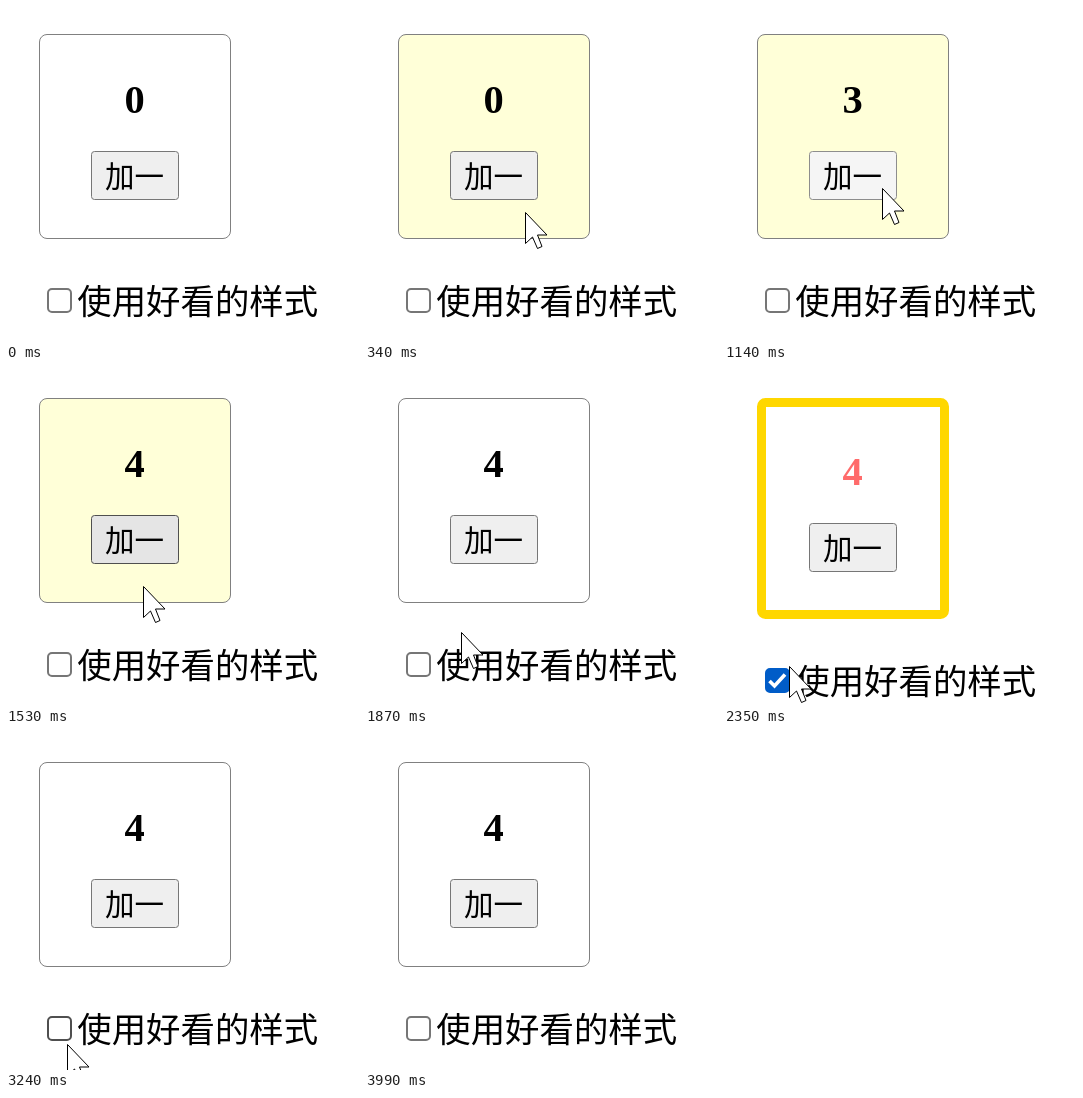
An HTML page with a canvas for the animation above (4520 ms loop, 353x336 px).

```html
<!DOCTYPE html>
<html lang="zh">
<head>
<meta charset="utf-8">
<style>
  html, body { margin: 0; width: 100%; height: 100%; overflow: hidden; background: #fff; }
  canvas { display: block; }
</style>
</head>
<body>
<canvas id="stage" width="353" height="336"></canvas>
<script>
const ctx = document.getElementById('stage').getContext('2d');
const LOOP = 4520, STEP = 70;
const SANS = '"Noto Sans CJK SC", "Noto Sans CJK", sans-serif';

// Pointer key points: time, x, y
const keys = [
  [130, 220, 312], [340, 160, 206], [610, 158, 182],
  [1460, 158, 182], [1530, 137, 216], [2010, 65, 296],
  [2830, 65, 296], [2970, 61, 310],
  [3510, 61, 310], [3990, 277, 338]
];
const ARROW = new Path2D('M.5 .5V31.5L7.5 25L12.5 36.5L17 34.5L12.5 23H22Z');

// The pointer moves in small jumps between key points
function pointerAt(t) {
  const i = keys.findLastIndex(k => k[0] <= t);
  if (i < 0) return [-99, -99];
  const [t0, x0, y0] = keys[i];
  const [t1, x1, y1] = keys[i + 1] || [LOOP, x0, y0];
  const n = Math.round((t1 - t0) / STEP);
  const f = Math.floor((t - t0) / (t1 - t0) * n) / n;
  return [Math.round(x0 + (x1 - x0) * f), Math.round(y0 + (y1 - y0) * f)];
}

const inside = ([px, py], x, y, w, h) => px >= x && px <= x + w && py >= y && py <= y + h;

// Four button clicks, in two quick pairs
function buttonState(t) {
  let count = 0, down = false;
  for (let i = 0; i < 4; i++) {
    const press = 680 + 130 * i + 70 * (i >> 1);
    if (t >= press + 60) count++;
    else if (t >= press) down = true;
  }
  return { count, down };
}

function box(x, y, w, h, r, line, fill, stroke) {
  ctx.beginPath();
  ctx.roundRect(x + line / 2, y + line / 2, w - line, h - line, r);
  ctx.fillStyle = fill;
  ctx.fill();
  ctx.lineWidth = line;
  ctx.strokeStyle = stroke;
  ctx.stroke();
}

function text(str, x, y, font, color = '#000') {
  ctx.font = font;
  ctx.fillStyle = color;
  ctx.textAlign = 'center';
  ctx.fillText(str, x, y);
}

function checkbox(y, checked, down, hover) {
  const blue = down ? '#3793ff' : '#005cc8';
  const gray = down ? '#8d8d8d' : hover ? '#4f4f4f' : '#767676';
  box(41, y, 25, 25, 4, 2, checked ? blue : '#fff', checked ? blue : gray);
  if (!checked) return;
  ctx.beginPath();
  ctx.moveTo(45.5, y + 13);
  ctx.lineTo(50.5, y + 18);
  ctx.lineTo(61, y + 6.5);
  ctx.lineWidth = 3.6;
  ctx.strokeStyle = '#fff';
  ctx.stroke();
}

function pointer(x, y) {
  ctx.save();
  ctx.translate(x, y);
  ctx.fillStyle = '#fff';
  ctx.fill(ARROW);
  ctx.lineWidth = 1;
  ctx.strokeStyle = '#000';
  ctx.stroke(ARROW);
  ctx.restore();
}

function draw(t) {
  const pos = pointerAt(t);
  const { count, down } = buttonState(t);
  const nice = t >= 2350 && t < 3240;
  const boxDown = (t >= 2210 && t < 2350) || (t >= 3100 && t < 3240);
  const d = nice ? 8 : 0;

  ctx.fillStyle = '#fff';
  ctx.fillRect(0, 0, 353, 336);

  if (nice) box(33, 28, 192, 221, 4, 9, '#fff', '#ffd700');
  else box(33, 28, 192, 205, 7.5, 1, inside(pos, 33, 28, 192, 205) ? '#ffffd8' : '#fff', '#808080');

  text(count, 128.5, 107 + d, 'bold 40.5px "Liberation Serif", serif', nice ? '#ff6b6b' : '#000');

  // The button's hover style trails the pointer by one step
  const hover = inside(pointerAt(t - STEP), 85, 145 + d, 88, 49);
  box(85, 145 + d, 88, 49, 3, 1,
    down ? '#f5f5f5' : hover ? '#e5e5e5' : '#efefef',
    down ? '#8d8d8d' : hover ? '#4f4f4f' : '#767676');
  text('加一', 128.5, 181 + d, '350 29.5px ' + SANS);

  checkbox(282 + 2 * d, nice, boxDown, inside(pos, 41, 276 + 2 * d, 271, 39));
  text('使用好看的样式', 191.7, 308 + 2 * d, '350 34.4px ' + SANS);

  pointer(...pos);
}

const start = performance.now();
function tick() {
  draw((performance.now() - start) % LOOP);
  requestAnimationFrame(tick);
}
tick();
</script>
</body>
</html>
```
